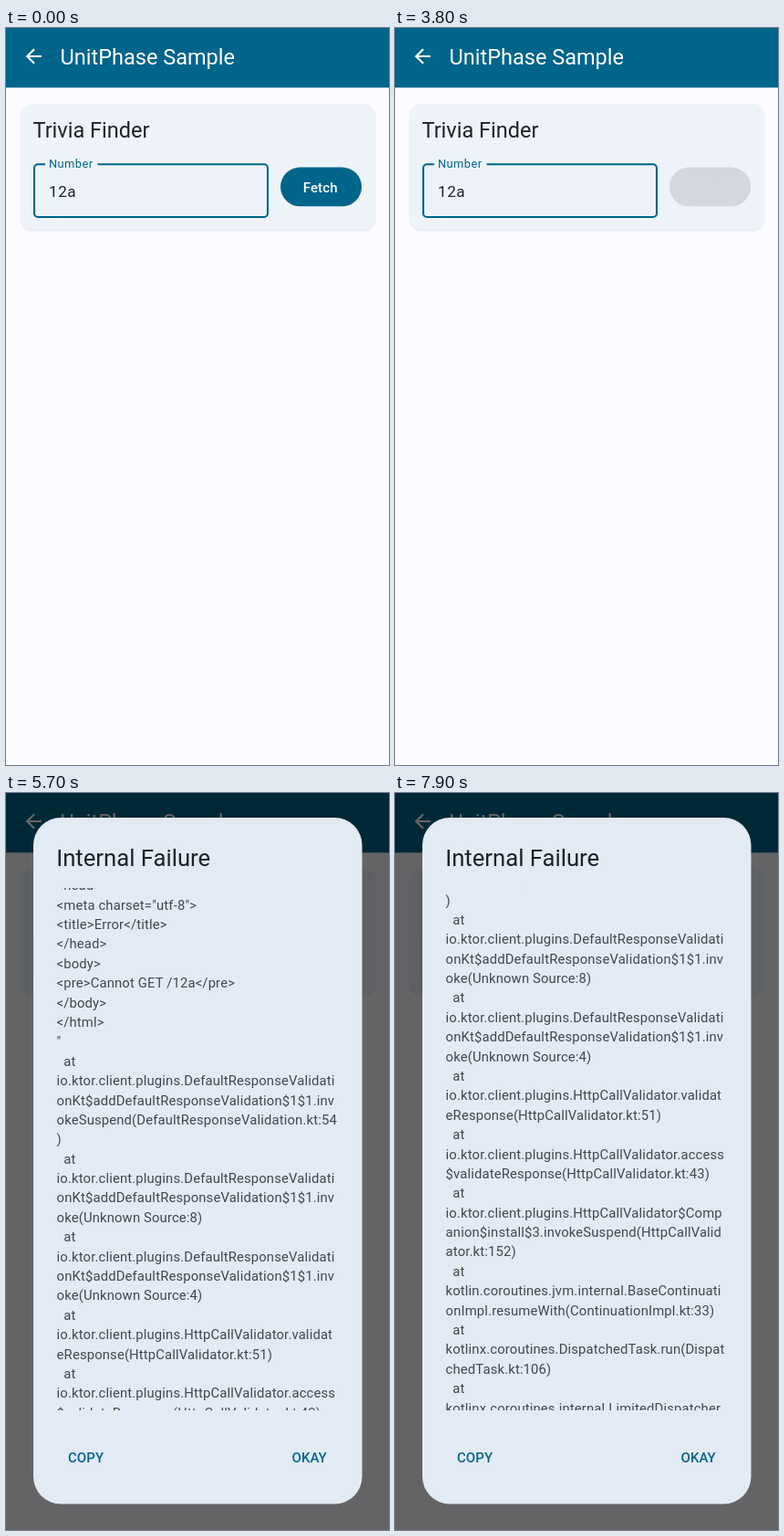
Recreate the animation shown at these times as an HTML page. Size 420 by 807 pixels, loop 8000 ms.

```html
<!DOCTYPE html>
<html lang="en">
<head>
<meta charset="utf-8">
<title>Task state demo</title>
<style>
html, body { margin: 0; width: 100%; height: 100%; overflow: hidden; background: #fcfbff; }
svg { display: block; width: 100%; height: 100%; font-family: Roboto, "Open Sans", sans-serif; }
text { white-space: pre; }

.bar { fill: #00658b; }
.accent { fill: #00658b; }
.large { font-size: 23.5px; }
.ink { fill: #1f2225; }
.label { font-size: 14.97px; font-weight: 500; letter-spacing: .1px; }
.card { fill: #edf3f9; filter: drop-shadow(0 1px 1px rgba(0, 0, 0, .1)); }
.line { fill: none; stroke: #00658b; stroke-width: 2.1; }
#log text { font-size: 14.8px; letter-spacing: .16px; fill: #41484d; }

.caret, .idle, .busy, .ripple, .scrim, .dialog, .sheet, #log, .touch {
  animation: 8s linear infinite;
}
.caret { animation: blink 1s step-end infinite; }
.idle { animation-name: idle; animation-timing-function: step-end; }
.busy { animation-name: busy; animation-timing-function: step-end; }
.ripple { animation-name: ripple; fill: #1a2b3a; }
.scrim { animation-name: scrim; }
.dialog { animation-name: appear; }
.sheet { animation-name: rise; }
#log { animation-name: scroll; }
.touch { animation-name: drag; }

@keyframes blink { 0% { opacity: 0 } 25% { opacity: 1 } 75%, 100% { opacity: 0 } }
@keyframes idle { 0% { opacity: 1 } 14.69% { opacity: 0 } 48.75%, 100% { opacity: 1 } }
@keyframes busy { 0% { opacity: 0 } 14.69% { opacity: 1 } 48.75%, 100% { opacity: 0 } }
@keyframes ripple { 0%, 18.1% { opacity: .15 } 20.6%, 100% { opacity: 0 } }
@keyframes scrim { 0%, 48.75% { opacity: 0 } 51.25%, 100% { opacity: .6 } }
@keyframes appear { 0%, 48.75% { opacity: 0 } 50.14%, 100% { opacity: 1 } }
@keyframes rise {
  0%, 48.75% { transform: translateY(24px); animation-timing-function: cubic-bezier(.333, 1, .667, 1) }
  51.25%, 100% { transform: none }
}
@keyframes scroll {
  0%, 58.75% { transform: translateY(0) }
  63.75% { transform: translateY(-143.5px) }
  66.25% { transform: translateY(-235px); animation-timing-function: cubic-bezier(.15, .6, .4, 1) }
  73.75%, 74.375% { transform: translateY(-430px) }
  78.75% { transform: translateY(-620px) }
  80% { transform: translateY(-650px); animation-timing-function: cubic-bezier(.15, .6, .4, 1) }
  87.5%, 100% { transform: translateY(-682px) }
}
@keyframes drag {
  0%, 58.74% { opacity: 0; transform: translate(245px, 592px) }
  58.75% { opacity: 1; transform: translate(245px, 592px) }
  63.75% { opacity: 1; transform: translate(231.7px, 441px) }
  66.25% { opacity: 1; transform: translate(226px, 349.5px) }
  66.26% { opacity: 0; transform: translate(226px, 349.5px) }
  74.37% { opacity: 0; transform: translate(222px, 557px) }
  74.38% { opacity: 1; transform: translate(222px, 557px) }
  78.75% { opacity: 1; transform: translate(207.3px, 367px) }
  80% { opacity: 1; transform: translate(203px, 337px) }
  80.01%, 100% { opacity: 0; transform: translate(203px, 337px) }
}
</style>
</head>
<body>
<svg viewBox="0 0 420 807" preserveAspectRatio="none">
  <defs>
    <clipPath id="view"><rect x="50" y="104" width="330" height="572"/></clipPath>
  </defs>

  <rect width="420" height="807" fill="#fcfbff"/>
  <rect class="bar" width="420" height="65.3"/>
  <path transform="translate(17.4 18.2) scale(1.069)" fill="#fff"
    d="M20 11H7.83l5.59-5.59L12 4l-8 8 8 8 1.41-1.41L7.83 13H20z"/>
  <text class="large" x="59.6" y="40" fill="#fff">UnitPhase Sample</text>

  <rect class="card" x="16.2" y="83" width="388.5" height="138" rx="12.8"/>
  <text class="large ink" x="29.5" y="120">Trivia Finder</text>
  <path class="line" d="M43 149.3H35a4 4 0 0 0-4 4V203a4 4 0 0 0 4 4H283a4 4 0 0 0 4-4V153.3a4 4 0 0 0-4-4H100.5"/>
  <text class="accent" x="47" y="153.3" font-size="12.83" letter-spacing=".43">Number</text>
  <text class="ink" x="47" y="185.3" font-size="17.1" letter-spacing=".53">12a</text>
  <rect class="caret accent" x="77.5" y="167.5" width="2.1" height="22.5"/>

  <g class="idle">
    <rect class="accent" x="301" y="152.5" width="89" height="42.8" rx="21.4"/>
    <text class="label" x="325.8" y="179.5" fill="#fff">Fetch</text>
  </g>
  <g class="busy">
    <rect x="301" y="152.5" width="89" height="42.8" rx="21.4" fill="#d4d7de"/>
    <rect class="ripple" x="301" y="152.5" width="89" height="42.8" rx="21.4"/>
    <circle id="spinner" class="line" cx="345.5" cy="174.2" r="10" pathLength="360"/>
  </g>

  <rect class="scrim" width="420" height="807"/>
  <g class="dialog">
    <g class="sheet">
      <rect x="30" y="27" width="360.5" height="751.5" rx="30" fill="#e2eaf4"/>
      <text class="ink" x="55.2" y="80" font-size="25.66">Internal Failure</text>
      <g clip-path="url(#view)"><g id="log"></g></g>
      <text class="label accent" x="68" y="733">COPY</text>
      <text class="label accent" x="313.5" y="733">OKAY</text>
    </g>
  </g>
  <circle class="touch" r="9.3" fill="#f1f5fa" stroke="#b3cbd8" stroke-width="1.2"/>
</svg>

<script>
const request = `Client request(GET
http://numbersapi.com/12a) invalid: 404 Not
Found. Text: "<!DOCTYPE html>
<html lang="en">
<head>
<meta charset="utf-8">
<title>Error</title>
</head>
<body>
<pre>Cannot GET /12a</pre>
</body>
</html>
"`;
const validation = `io.ktor.client.plugins.DefaultResponseValidati
onKt$addDefaultResponseValidation$1$1.inv
`;
const calls = [
  validation + "okeSuspend(DefaultResponseValidation.kt:54\n)",
  validation + "oke(Unknown Source:8)",
  validation + "oke(Unknown Source:4)",
  "io.ktor.client.plugins.HttpCallValidator.validat\neResponse(HttpCallValidator.kt:51)",
  "io.ktor.client.plugins.HttpCallValidator.access\n$validateResponse(HttpCallValidator.kt:43)",
  "io.ktor.client.plugins.HttpCallValidator$Comp\nanion$install$3.invokeSuspend(HttpCallValid\nator.kt:152)",
  "kotlin.coroutines.jvm.internal.BaseContinuati\nonImpl.resumeWith(ContinuationImpl.kt:33)",
  "kotlinx.coroutines.DispatchedTask.run(Dispat\nchedTask.kt:106)",
  "kotlinx.coroutines.internal.LimitedDispatcher"
];
const report = [
  request, "", "io.ktor.client.plugins.ClientRequestException:", request,
  ...calls.map(call => "  at\n" + call)
].join("\n");

const log = document.getElementById("log");
report.split("\n").forEach((line, i) => {
  const row = document.createElementNS("http://www.w3.org/2000/svg", "text");
  row.setAttribute("x", 55.6);
  row.setAttribute("y", 120.2 + i * 21.385);
  row.textContent = line;
  log.append(row);
});

// cubic-bezier(.4, 0, .2, 1), solved by bisection
function ease(x) {
  if (x <= 0) return 0;
  if (x >= 1) return 1;
  let low = 0, high = 1, s;
  for (let i = 0; i < 20; i++) {
    s = (low + high) / 2;
    const at = 1.2 * (1 - s) ** 2 * s + .6 * (1 - s) * s * s + s ** 3;
    if (at < x) low = s; else high = s;
  }
  return 3 * (1 - s) * s * s + s ** 3;
}

const LOOP = 8000, SPIN_START = 1188, CYCLE = 1332;
const spinner = document.getElementById("spinner");
let origin;

function draw(now) {
  origin ??= now;
  const time = Math.max(0, (now - origin) % LOOP - SPIN_START);
  const turn = Math.floor(time / CYCLE);
  const part = time / CYCLE - turn;
  const head = 290 * ease(part * 2);
  const tail = 290 * ease(part * 2 - 1);
  const angle = -97 + 216 * turn + 286 * part + tail;
  spinner.setAttribute("stroke-dasharray", `${head - tail} 360`);
  spinner.setAttribute("transform", `rotate(${angle} 345.5 174.2)`);
  requestAnimationFrame(draw);
}
requestAnimationFrame(draw);
</script>
</body>
</html>
```
